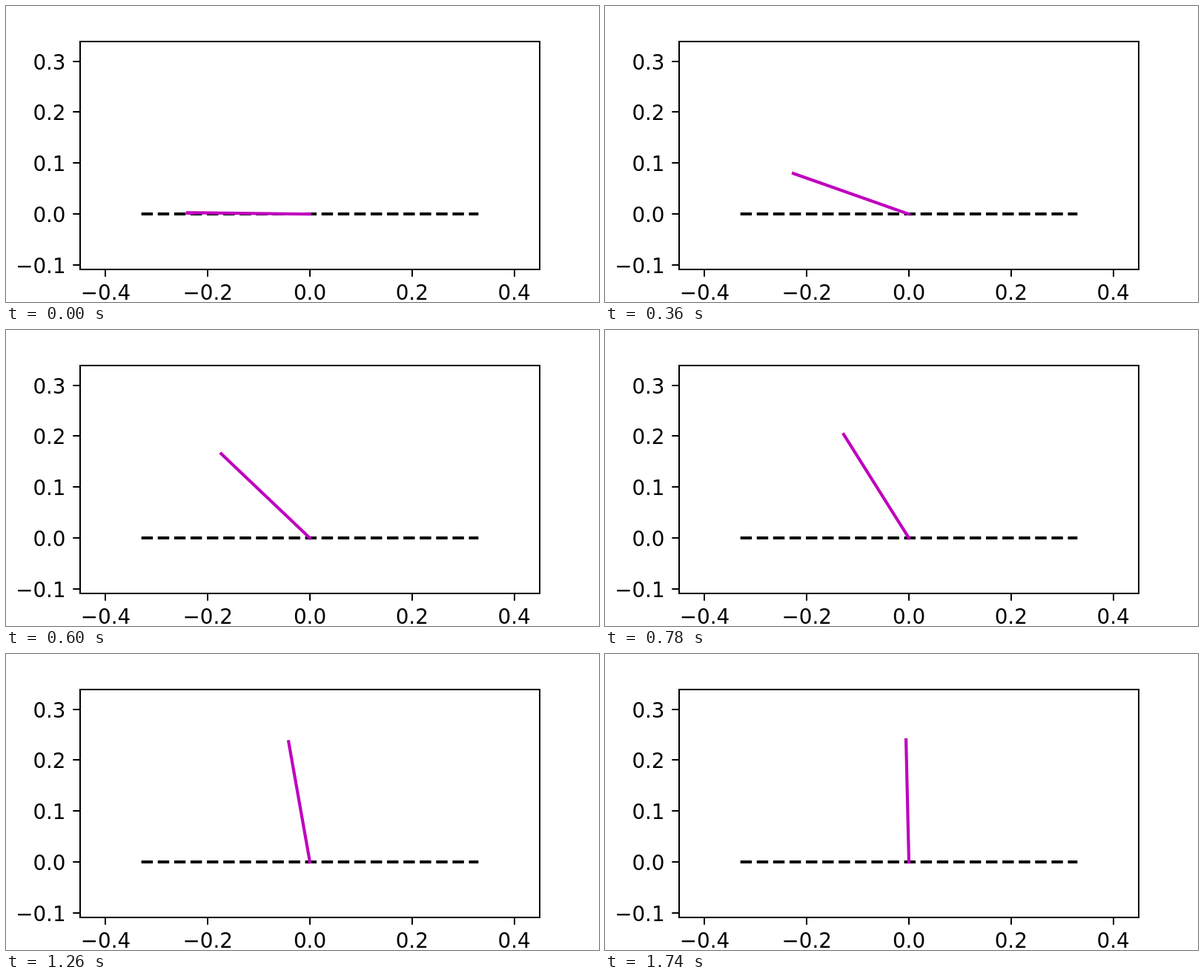
Animation, 800 px wide and 400 px high, one loop 1.8 s. Source, as an HTML page:

```html
<!DOCTYPE html>
<html>
<head>
<meta charset="utf-8">
<style>
  html, body { margin: 0; width: 100%; height: 100%; overflow: hidden; background: #fff; }
  svg { display: block; }
  text { font: 27.78px "DejaVu Sans", sans-serif; }
</style>
</head>
<body>
<svg width="800" height="400" viewBox="0 0 800 400">
  <g id="axes" fill="none" stroke="#000" stroke-width="2">
    <rect x="100" y="48" width="620" height="308"/>
  </g>
  <g id="labels"></g>
  <path d="M182.67 281H637.33" stroke="#000" stroke-width="4.17" stroke-dasharray="15.42 6.67"/>
  <line id="rod" x1="410" y1="281.2" stroke="#bf00bf" stroke-width="4.17" stroke-linecap="square"/>
</svg>
<script>
const $ = id => document.getElementById(id);
const SCALE = 620 / 0.9, X0 = 410, Y0 = 281.2, LENGTH = 0.24 * SCALE;
const STEP = 60, STEPS = 30;

function add(parent, tag, attrs, text = '') {
  const el = document.createElementNS('http://www.w3.org/2000/svg', tag);
  for (const key in attrs) el.setAttribute(key, attrs[key]);
  el.textContent = text;
  parent.append(el);
}

const label = v => v.toFixed(1).replace('-', '\u2212');

for (const v of [-0.4, -0.2, 0, 0.2, 0.4]) {
  const x = X0 + v * SCALE;
  add($('axes'), 'path', { d: `M${Math.round(x)} 356v9.7` });
  add($('labels'), 'text', { x, y: 397, 'text-anchor': 'middle' }, label(v));
}
for (const v of [-0.1, 0, 0.1, 0.2, 0.3]) {
  const y = Math.round(Y0 - v * SCALE);
  add($('axes'), 'path', { d: `M100 ${y}h-9.7` });
  add($('labels'), 'text', { x: 80.56, y: y + 11, 'text-anchor': 'end' }, label(v));
}

// Rod angle in degrees above the horizontal: [step, angle]
const knots = [[0, 0.65], [4, 10.5], [8, 30.93], [9, 37.65], [13, 57.85],
               [17, 71.5], [21, 79.97], [27, 87.75], [29, 88.65]];
const last = knots.length - 1;
const secant = i => (knots[i + 1][1] - knots[i][1]) / (knots[i + 1][0] - knots[i][0]);

function slope(i) {
  if (i === 0) return 2 * secant(0) - slope(1);
  if (i === last) return 2 * secant(last - 1) - slope(last - 1);
  const before = knots[i][0] - knots[i - 1][0], after = knots[i + 1][0] - knots[i][0];
  return (secant(i - 1) * after + secant(i) * before) / (before + after);
}

// Cubic Hermite interpolation between knots
function angleAt(n) {
  let i = 0;
  while (i < last - 1 && n >= knots[i + 1][0]) i++;
  const [n0, a0] = knots[i], [n1, a1] = knots[i + 1];
  const h = n1 - n0, u = (n - n0) / h, w = 1 - u;
  return a0 * w * w * (1 + 2 * u) + a1 * u * u * (3 - 2 * u)
    + h * u * w * (slope(i) * w - slope(i + 1) * u);
}

function draw() {
  const n = Math.floor(performance.now() / STEP) % STEPS;
  const a = angleAt(n) * Math.PI / 180;
  $('rod').setAttribute('x2', X0 - LENGTH * Math.cos(a));
  $('rod').setAttribute('y2', Y0 - LENGTH * Math.sin(a));
  requestAnimationFrame(draw);
}
draw();
</script>
</body>
</html>
```
